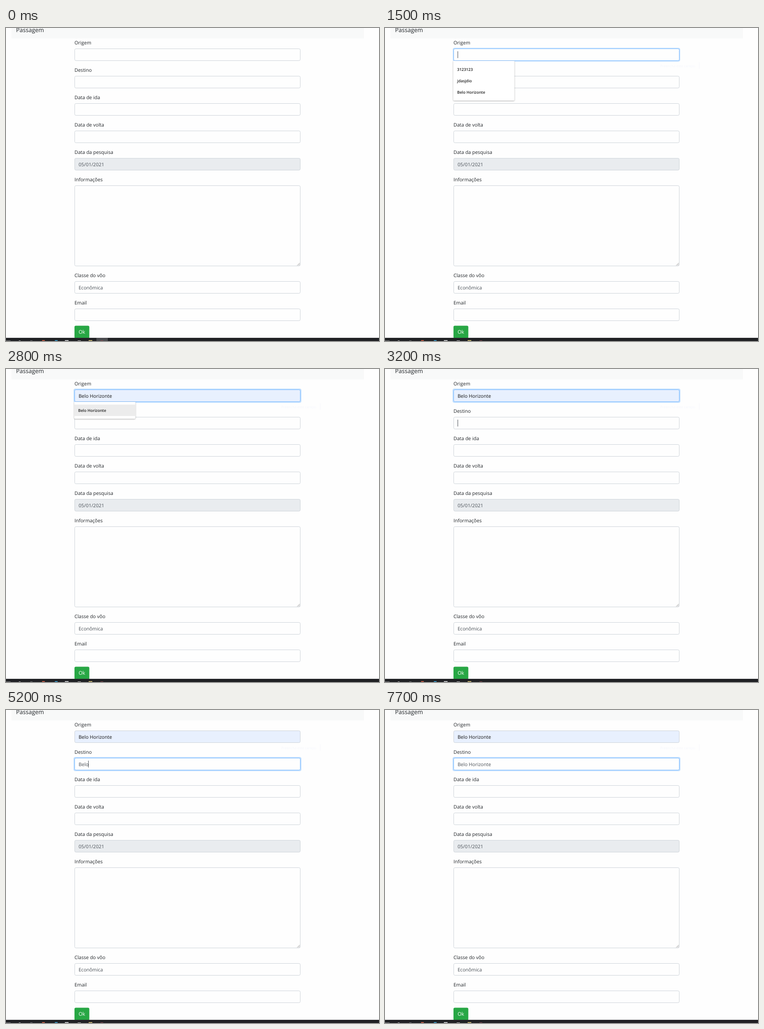
Recreate the animation shown at these times as an HTML page with a canvas. Size 817 by 686 pixels, loop 8 s.

```html
<!DOCTYPE html>
<html lang="pt-BR">
<head>
<meta charset="utf-8">
<title>Passagem</title>
<style>
  html, body { margin: 0; width: 100%; height: 100%; overflow: hidden; background: #fefefe; }
  canvas { display: block; }
</style>
</head>
<body>
<canvas id="stage" width="817" height="686"></canvas>
<script>
const ctx = document.getElementById('stage').getContext('2d');
const LOOP = 8000;
const FONT = '"Open Sans", "Noto Sans", sans-serif';
const LEFT = 150, WIDTH = 495, FIELD_H = 27;
const CITY = 'Belo Horizonte';
const ORIGIN_Y = 45, DEST_Y = 105;

// Time at which each character of the destination is typed.
const DEST_KEYS = [4700, 4800, 4900, 5200, 5900, 6200, 6400, 6500, 6600,
                   6800, 6900, 7000, 7100, 7200];

const between = (t, from, to) => t >= from && t < to;

function setFont(size, weight = 400) {
  ctx.font = `${weight} ${size}px ${FONT}`;
  ctx.textRendering = 'geometricPrecision';
}

function text(str, x, y, size = 10.55, color = '#212529', weight = 400) {
  setFont(size, weight);
  ctx.fillStyle = color;
  ctx.fillText(str, x, y);
}

function rect(x, y, w, h, color) {
  ctx.fillStyle = color;
  ctx.fillRect(x, y, w, h);
}

function box(x, y, w, h, radius, fill, stroke) {
  ctx.beginPath();
  ctx.roundRect(x, y, w, h, radius);
  if (fill) { ctx.fillStyle = fill; ctx.fill(); }
  if (stroke) { ctx.strokeStyle = stroke; ctx.lineWidth = 1; ctx.stroke(); }
}

// focus runs from 0 (idle) to 1 (full ring).
function field(y, { h = FIELD_H, fill = '#fefefe', value = '', color = '#495057', focus = 0 } = {}) {
  if (focus) {
    const spread = 2 * focus;
    box(LEFT - spread, y - spread, WIDTH + 2 * spread, h + 2 * spread, 4, '#bfdeff');
  }
  box(LEFT + 0.5, y + 0.5, WIDTH - 1, h - 1, 2.8, fill, focus ? '#80bdff' : '#ced4da');
  if (value) text(value, 159, y + 18, 10.55, color);
}

function caret(value, y) {
  setFont(10.55);
  const x = Math.floor(159.2 + ctx.measureText(value).width);
  rect(x, y + 6, 1, 15, '#495057');
}

function dropdown(items, hovered) {
  const h = items.length * 25 + 12;
  ctx.save();
  ctx.shadowColor = 'rgba(0,0,0,.32)';
  ctx.shadowBlur = 3;
  ctx.shadowOffsetY = 1;
  box(149.5, 72, 134, h, [0, 0, 2, 2], '#fff');
  ctx.restore();
  if (hovered) rect(150, 78, 133, 25, '#ececec');
  items.forEach((item, i) => text(item, 158, 94 + 25 * i, 8.6, '#222', 600));
}

function tooltip() {
  box(597.5, 73.5, 92, 17, 0, '#fff', '#8a8a8a');
  text('Preencha este campo', 603, 85.5, 8, '#575757');
}

function tooltipTrace() {
  text('Preencha este campo', 603, 85.5, 7.6, '#f4f6fc');
  rect(688, 75, 1, 14, '#f6f7fb');
}

function taskbar(active) {
  rect(0, 679, 817, 7, '#202124');
  rect(0, 679, 817, 1, '#2b2c2f');
  if (active) rect(198, 679, 25, 7, '#4b4c4f');
  rect(0, 685, 10, 1, '#85878a');
  rect(28, 685, 4, 1, '#b8babd');
  rect(53, 685, 5, 1, '#77797c');
  rect(79, 684, 6, 2, '#b5553f');
  rect(107, 684, 6, 2, '#378bb5');
  rect(129, 684, 8, 2, '#b9bbbd');
  rect(157, 685, 7, 1, '#c8c8c8');
  rect(181, 684, 8, 2, '#b4a66b');
  rect(207, 685, 6, 1, '#8b4b50');
}

function page() {
  rect(0, 0, 817, 686, '#fefefe');
  rect(12, 0, 772, 23, '#f8f9f9');
  text('Passagem', 22, 9, 13);

  ['Origem', 'Destino', 'Data de ida', 'Data de volta', 'Data da pesquisa', 'Informações']
    .forEach((label, i) => text(label, LEFT, 35.5 + 60 * i));
  field(165);
  field(225);
  field(285, { fill: '#e9ecef', value: '05/01/2021' });
  field(345, { h: 177 });

  ctx.strokeStyle = '#777';
  ctx.lineWidth = 0.8;
  ctx.beginPath();
  ctx.moveTo(638, 520.5); ctx.lineTo(643.5, 515);
  ctx.moveTo(641, 520.5); ctx.lineTo(643.5, 518);
  ctx.stroke();

  text('Classe do vôo', LEFT, 545.5);
  field(555, { value: 'Econômica' });
  text('Email', LEFT, 605.5);
  field(615);
  box(LEFT, 652.5, 32.5, 28, 3, '#28a745');
  text('Ok', 159, 670, 11, '#fff');
}

function origin(t) {
  const filled = t >= 2800;
  const value = filled ? CITY : t >= 1900 ? 'Be' : t >= 1800 ? 'B' : '';
  let focus = 0;
  if (between(t, 1400, 3300)) focus = t < 1500 ? 0.4 : t < 1600 ? 0.75 : 1;

  field(ORIGIN_Y, {
    value, focus,
    fill: filled ? '#e8f0fe' : '#fefefe',
    color: filled ? '#111' : '#495057'
  });
  if (between(t, 1400, 2400) || between(t, 3000, 3200)) caret(value, ORIGIN_Y);
}

function destination(t) {
  const value = CITY.slice(0, DEST_KEYS.filter(key => t >= key).length);
  field(DEST_Y, { value, focus: t >= 3300 ? 1 : 0 });

  // The caret blinks every 500 ms, restarting at each key press.
  const start = DEST_KEYS.filter(key => t >= key).pop() ?? 3200;
  const visible = t < 3300 || Math.floor((t - Math.max(start, 3200)) / 500) % 2 === 0;
  if (t >= 3200 && visible) caret(value, DEST_Y);
}

function draw(t) {
  page();
  origin(t);
  destination(t);
  if (between(t, 1100, 1400)) tooltip();
  if (t >= 1400) tooltipTrace();
  if (between(t, 1500, 1800)) dropdown(['3123123', 'jdasjdio', CITY]);
  if (between(t, 1800, 3000)) dropdown([CITY], t >= 2800);
  taskbar(t < 1400);
}

const began = performance.now();
function tick() {
  draw((performance.now() - began) % LOOP);
  requestAnimationFrame(tick);
}
tick();
</script>
</body>
</html>
```
